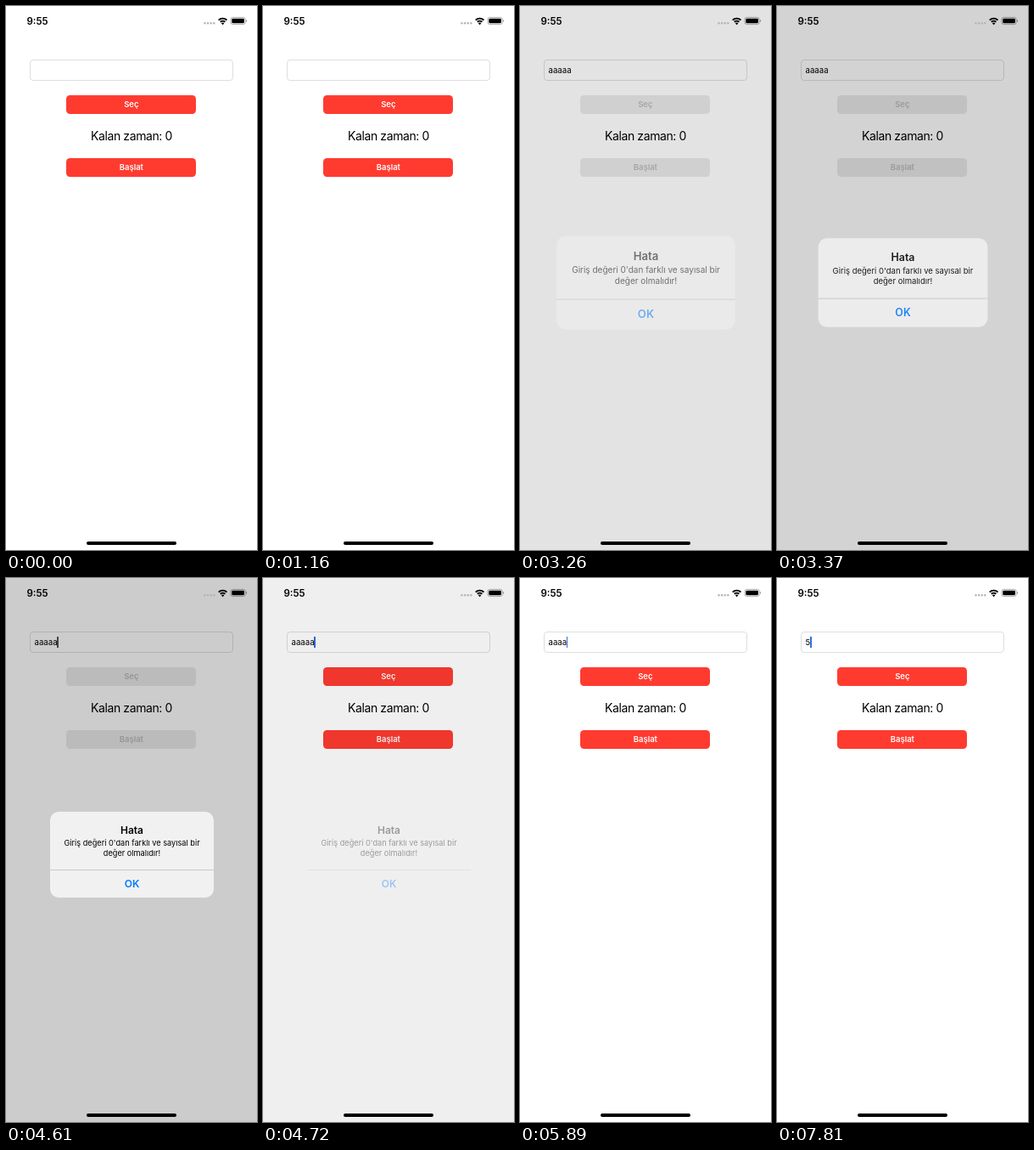
Animation, 296 px wide and 640 px high, one loop 8 s. Source, as an HTML page:

```html
<!DOCTYPE html>
<html lang="tr">
<head>
<meta charset="utf-8">
<title>Kalan zaman</title>
<style>
  html, body { margin: 0; width: 100%; height: 100%; overflow: hidden; background: #fff; }
  body { font-family: Inter, Roboto, "Liberation Sans", sans-serif; color: #000; }
  #stage { position: relative; width: 296px; height: 640px; overflow: hidden; background: #fff; }
  #stage > * { position: absolute; box-sizing: border-box; }
  .time { left: 24.5px; top: 10px; font-size: 11.5px; line-height: 16px; font-weight: 600; }
  .status { left: 0; top: 0; }
  .field {
    left: 28px; top: 62.5px; width: 239.5px; height: 25px; padding-left: 4.6px;
    border: 1px solid rgba(0, 0, 0, .13); border-radius: 4px;
    font-size: 9.6px; line-height: 23px; white-space: nowrap;
  }
  #caret {
    display: inline-block; width: 1.4px; height: 13px; margin-left: -.2px;
    vertical-align: -3px; background: #2f6de0;
  }
  .button {
    left: 71.2px; width: 153.3px; height: 21.5px; border-radius: 4.5px;
    background: #ff3b30; color: #fff;
    font-size: 9.5px; line-height: 21.5px; font-weight: 600; text-align: center;
  }
  .label {
    left: 0; top: 143px; width: 296px; text-align: center;
    font-size: 14px; line-height: 20px; letter-spacing: -.4px;
  }
  .tinted .button { background: #e9e9e9; color: #bababa; }
  .tinted #caret { background: #555; }
  #dim { inset: 0; background: #000; opacity: 0; }
  #alert {
    left: 51.5px; top: 275px; width: 193px; height: 100.5px; border-radius: 10px;
    background: #f1f1f1; text-align: center; opacity: 0;
  }
  #alert > * { position: absolute; left: 0; width: 100%; }
  #alert h1 { top: 14px; margin: 0; font-size: 12px; line-height: 16px; font-weight: 600; }
  #alert p { top: 31px; margin: 0; font-size: 9.2px; line-height: 11.8px; white-space: nowrap; }
  #alert b {
    top: 68px; height: 32px; border-top: 1px solid #c9c9c9; box-sizing: border-box;
    color: #007aff; font-size: 12px; line-height: 32px; font-weight: 600;
  }
  .home { left: 95px; top: 630.4px; width: 106px; height: 3.7px; border-radius: 2px; background: #000; }
</style>
</head>
<body>
<div id="stage">
  <div class="field"><span id="entry"></span><span id="caret"></span></div>
  <div class="button" style="top:105px">Seç</div>
  <div class="label">Kalan zaman: 0</div>
  <div class="button" style="top:179.3px">Başlat</div>
  <div id="dim"></div>
  <div class="time">9:55</div>
  <svg class="status" width="296" height="36">
    <path d="M234.5 20.3h12" stroke="#b4b4b4" stroke-width="2.6" stroke-linecap="round" stroke-dasharray="0 3.6"/>
    <g fill="none" stroke="#000" stroke-width="1.9">
      <path d="M250.7 16.6a7 7 0 0 1 9.8 0"/>
      <path d="M252.8 18.8a4 4 0 0 1 5.6 0"/>
    </g>
    <path d="M255.6 22.2l-1.8-1.9a2.6 2.6 0 0 1 3.6 0z"/>
    <rect x="265" y="13.4" width="17.2" height="8.2" rx="2.4" fill="none" stroke="#000" stroke-opacity=".4" stroke-width=".8"/>
    <rect x="266.3" y="14.7" width="14.6" height="5.6" rx="1.3"/>
    <path d="M283.2 16.1a1.5 1.5 0 0 1 0 2.8z" fill-opacity=".45"/>
  </svg>
  <div id="alert">
    <h1>Hata</h1>
    <p>Giriş değeri 0'dan farklı ve sayısal bir<br>değer olmalıdır!</p>
    <b>OK</b>
  </div>
  <div class="home"></div>
</div>
<script>
  const LOOP = 8000;
  const $ = id => document.getElementById(id);
  const stage = $('stage'), entry = $('entry'), caret = $('caret'), dim = $('dim'), box = $('alert');

  // Every track lists [start ms, value...]; values hold until the next row.
  const typing = [
    [0, ''], [1830, 'a'], [2010, 'aa'], [2200, 'aaa'], [2370, 'aaaa'], [2520, 'aaaaa'],
    [5890, 'aaaa'], [6070, 'aaa'], [6180, 'aa'], [6280, 'a'], [6380, ''], [7810, '5']
  ];
  const blink = [
    [0, 0], [1720, 1], [3150, 0], [4610, 1], [5170, .5], [5290, 0], [5610, 1],
    [6890, .5], [7010, 0], [7250, .5], [7370, 1]
  ];
  // dim level, alert opacity, alert scale, controls tinted
  const popup = [
    [0, 0, 0, 1, 0],
    [3150, .15, .12, 1.17, 0], [3260, .55, .5, 1.09, 1], [3370, .86, .86, 1.035, 1],
    [3480, .97, .97, 1.008, 1], [3590, 1, 1, 1, 1],
    [4720, .31, .35, 1, 0], [4830, .08, .08, 1, 0], [4940, 0, 0, 1, 0]
  ];
  const at = (track, t) => track.findLast(row => row[0] <= t);

  function draw() {
    const t = performance.now() % LOOP;
    const [, shade, alpha, scale, tinted] = at(popup, t);
    entry.textContent = at(typing, t)[1];
    caret.style.opacity = at(blink, t)[1];
    dim.style.opacity = shade * .2;
    box.style.opacity = alpha;
    box.style.transform = `scale(${scale})`;
    stage.classList.toggle('tinted', !!tinted);
    requestAnimationFrame(draw);
  }
  draw();
</script>
</body>
</html>
```
